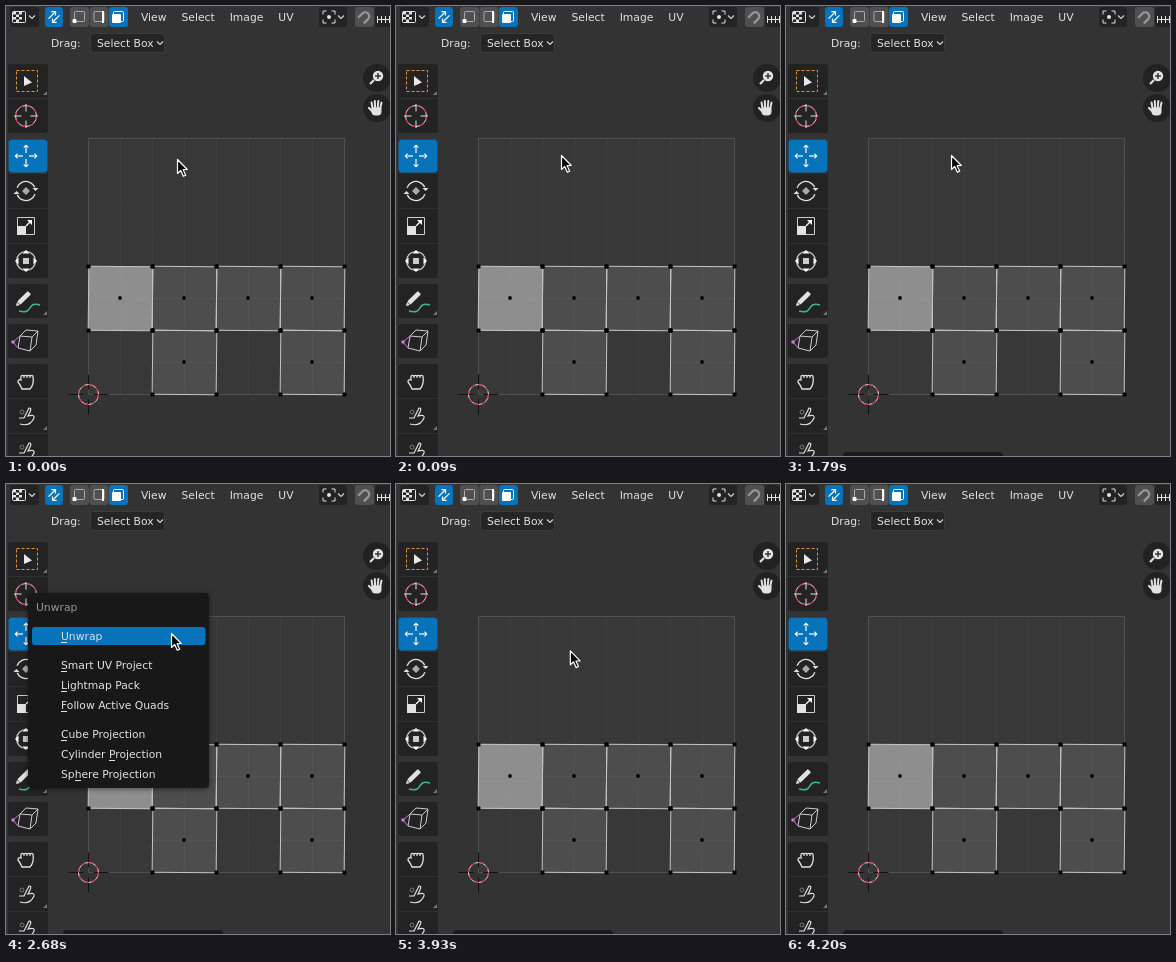
Write an HTML page with a canvas that moves like this. It is 384x450 px and loops after 4.46 s.

```html
<!DOCTYPE html>
<html lang="en">
<head>
<meta charset="utf-8">
<title>Unwrap menu</title>
<style>
html, body { margin: 0; width: 100%; height: 100%; overflow: hidden; background: #333; }
canvas { display: block; }
</style>
</head>
<body>
<canvas id="stage" width="384" height="450"></canvas>
<script>
const ctx = document.getElementById('stage').getContext('2d');
const LOOP = 4460;
const BLUE = '#0773bb', LIGHT = '#e2e2e2', DARK = '#232323', GREY = '#505050';
ctx.font = '10.75px "DejaVu Sans", sans-serif';

function paint(fill, edge, width = 1) {
  if (fill) { ctx.fillStyle = fill; ctx.fill(); }
  if (edge) { ctx.strokeStyle = edge; ctx.lineWidth = width; ctx.stroke(); }
}

function box(x, y, w, h, fill, radius = 3, edge) {
  ctx.beginPath();
  ctx.roundRect(x, y, w, h, radius);
  paint(fill, edge);
}

function circle(x, y, r, fill, edge, width) {
  ctx.beginPath();
  ctx.arc(x, y, r, 0, Math.PI * 2);
  paint(fill, edge, width);
}

function line(x1, y1, x2, y2, color = LIGHT, width = 1) {
  ctx.beginPath();
  ctx.moveTo(x1, y1);
  ctx.lineTo(x2, y2);
  paint(null, color, width);
}

function shape(points, fill, edge, width) {
  ctx.beginPath();
  points.forEach(([x, y]) => ctx.lineTo(x, y));
  ctx.closePath();
  paint(fill, edge, width);
}

function at(x, y, draw, angle = 0) {
  ctx.save();
  ctx.translate(x, y);
  ctx.rotate(angle);
  draw();
  ctx.restore();
}

function around(count, draw) {
  for (let i = 0; i < count; i++) at(0, 0, draw, i * Math.PI * 2 / count);
}

function label(text, x, y, color = LIGHT) {
  ctx.fillStyle = color;
  ctx.fillText(text, x, y);
}

// Triangle pointing up, with its tip at (x, y).
const head = (x, y, size, color = '#fff') =>
  shape([[x, y], [x + size, y + size], [x - size, y + size]], color);

function chevron(x, y) {
  line(x - 3, y - 1.5, x, y + 1.5, '#ccc', 1.2);
  line(x, y + 1.5, x + 3, y - 1.5, '#ccc', 1.2);
}

function redRing(r) {
  const dash = r * Math.PI / 8;
  circle(0, 0, r, null, '#ddd');
  ctx.setLineDash([dash, dash]);
  circle(0, 0, r, null, '#d22845', 1.2);
  ctx.setLineDash([]);
}

function arrowPair() {
  around(2, () => {
    line(-2.7, -4, -2.7, 5, '#fff', 1.2);
    line(-2.7, -5, -5.7, -2, '#fff', 1.2);
    line(-2.7, -5, 0, -2, '#fff', 1.2);
  });
}

function checkerIcon() {
  box(6.5, 5.5, 13, 11, null, 1, LIGHT);
  ctx.fillStyle = LIGHT;
  for (let i = 0; i < 12; i++) {
    const col = i % 3, row = Math.floor(i / 3);
    if ((col + row) % 2 === 0) ctx.fillRect(7 + col * 3, 6 + row * 2.5, 3, 2.5);
  }
}

function magnet() {
  ctx.beginPath();
  ctx.moveTo(-4, 5);
  ctx.arc(0, -1, 4, Math.PI, 0);
  ctx.lineTo(4, 5);
  paint(null, '#999', 2.2);
}

function selectModes() {
  for (let i = 0; i < 3; i++) {
    const x = 64 + i * 19.5, on = i === 2;
    box(x, 1, 19, 20, on ? BLUE : GREY, 3);
    box(x + 4.5, 5.5, 10, 10, null, 1, on ? '#fff' : '#aaa');
    if (i === 0) box(x + 2.5, 13, 4, 4, '#fff', 1);
    if (i === 1) line(x + 13.5, 5, x + 13.5, 17, '#fff', 2);
    if (on) box(x + 3, 8, 9, 9, '#fff', 1);
  }
}

function header() {
  box(4, 1, 29, 20, DARK);
  checkerIcon();
  chevron(26, 11);
  box(39, 1, 18, 20, BLUE);
  at(48, 11, arrowPair, Math.PI / 4);
  selectModes();

  let x = 135;
  for (const name of ['View', 'Select', 'Image', 'UV']) {
    label(name, x, 15);
    x += ctx.measureText(name).width + 15;
  }

  box(313, 1, 28, 20, DARK);
  at(323, 11, () => around(4, () => {
    line(-6, -6, -2.5, -6);
    line(-6, -6, -6, -2.5);
  }));
  circle(323, 11, 2, LIGHT);
  chevron(335, 11);

  box(349, 1, 19, 20, GREY);
  at(358.5, 11, magnet, Math.PI / 4);
  box(369, 1, 24, 20, DARK);
  line(371, 13.5, 384, 13.5);
  for (let tick = 371.5; tick < 384; tick += 4) line(tick, 10, tick, 17);

  label('Drag:', 45, 41);
  box(84.5, 27.5, 74, 19, '#252525', 3, '#3c3c3c');
  label('Select Box', 91, 41);
  chevron(154, 37);
}

// Tool icons, drawn around the centre of their button.
function selectIcon() {
  ctx.setLineDash([3, 2]);
  box(-9.5, -10.5, 21, 21, null, 0, '#dd9540');
  ctx.setLineDash([]);
  shape([[-2, -5], [-2, 5], [6, 1.5]], '#e8e8e8');
}

function cursorIcon() {
  redRing(10.5);
  around(4, () => line(0, -4.5, 0, -12));
}

function moveIcon() {
  around(4, () => {
    line(0, -3, 0, -8, '#fff', 1.2);
    head(0, -11.5, 3);
  });
}

function rotateIcon() {
  around(2, () => {
    ctx.beginPath();
    ctx.arc(0, 0, 9.5, -2.8, -0.4);
    paint(null, LIGHT, 1.3);
    at(9.5, 0, () => head(0, 0, 3, LIGHT), Math.PI);
  });
  at(0, 0, () => box(-2.8, -2.8, 5.6, 5.6, '#aaa', 0), Math.PI / 4);
}

function scaleIcon() {
  box(-8.5, -8.5, 17, 17, null, 0, '#ccc');
  box(-9, 0, 9, 9, LIGHT, 0);
  line(0, 0, 5, -5, '#fff', 1.2);
  shape([[6, -6], [1, -6], [6, -1]], '#fff');
}

function transformIcon() {
  circle(0, 0, 9.5, null, '#ccc', 1.2);
  box(-3, -3, 6, 6, '#ccc', 0);
  around(4, () => head(0, -11, 3.5));
}

function annotateIcon() {
  ctx.beginPath();
  ctx.moveTo(-7, 10);
  ctx.bezierCurveTo(8, 14, 0, 0, 14, 4);
  paint(null, '#3fb984', 1.6);
  at(-10, 5, () => {
    box(4, -2.3, 15, 4.6, LIGHT, 1);
    shape([[0, 0], [3.5, -2], [3.5, 2]], LIGHT);
  }, -Math.PI / 4);
}

function shearIcon() {
  const front = [[-6, -5], [6, -4], [4, 10], [-8, 7]];
  const back = front.map(([x, y]) => [x + 6, y - 6]);
  shape(front, null, '#ccc');
  for (let i = 0; i < 3; i++) line(...front[i], ...back[i], '#ccc');
  for (let i = 0; i < 2; i++) line(...back[i], ...back[i + 1], '#ccc');
  line(-13, 1, -6, -5, '#c77bd8');
  line(-13, 1, -8, 7, '#c77bd8');
  circle(-13, 1, 1.8, '#c77bd8');
}

function grabIcon() {
  ctx.beginPath();
  ctx.moveTo(-4, 8);
  ctx.quadraticCurveTo(-5, 5, -8, 1);
  ctx.quadraticCurveTo(-8, -2, -5, -1);
  for (let i = 0; i < 4; i++) ctx.arc(-3.5 + i * 3, -4, 1.6, Math.PI, 0);
  ctx.quadraticCurveTo(8, 4, 4, 8);
  ctx.closePath();
  paint(null, LIGHT, 1.3);
}

function fingerIcon() {
  ctx.beginPath();
  ctx.moveTo(-7, 2);
  ctx.lineTo(-2, 2);
  ctx.lineTo(3, -8);
  ctx.quadraticCurveTo(6, -8, 4, -4);
  ctx.lineTo(2, 0);
  ctx.quadraticCurveTo(9, -2, 8, 2);
  ctx.quadraticCurveTo(4, 11, -6, 8);
  paint(null, LIGHT, 1.2);
  circle(-4, -4, 2, null, '#777');
}

const TOOLS = [
  [selectIcon, cursorIcon],
  [moveIcon, rotateIcon, scaleIcon, transformIcon],
  [annotateIcon],
  [shearIcon],
  [grabIcon, fingerIcon, fingerIcon]
];
const HAS_MORE = [selectIcon, annotateIcon, fingerIcon];

function toolbar() {
  let y = 58;
  for (const group of TOOLS) {
    box(2, y, 40, group.length * 35 - 1, DARK);
    group.forEach((icon, i) => {
      if (i) line(2, y - 0.5, 42, y - 0.5, '#303030');
      if (icon === moveIcon) box(2.5, y + 0.5, 39, 33, BLUE, 3, '#1d4f70');
      at(20, y + 17, icon);
      if (HAS_MORE.includes(icon)) shape([[41, y + 27], [41, y + 31], [37, y + 31]], '#777');
      y += 35;
    });
    y += 5;
  }
}

function openHand() {
  ctx.lineCap = 'round';
  for (let i = 0; i < 4; i++) {
    at(-3.5 + i * 2.6, 0, () => line(0, 2, 0, i % 3 ? -7 : -5.5, LIGHT, 2), (i - 1.3) * 0.13);
  }
  line(-7, 0, -3, 4, LIGHT, 2.2);
  box(-4.5, -0.5, 10, 8, LIGHT, [1, 1, 4, 4]);
}

function viewButtons() {
  for (const y of [72, 102]) circle(371, y, 14, '#222');
  circle(372, 70, 5.2, LIGHT);
  line(368, 74, 364, 78, LIGHT, 2.2);
  line(369, 70, 375, 70, '#222', 1.3);
  line(372, 67, 372, 73, '#222', 1.3);
  at(370, 102, openHand);
}

const CELL = 64, HALF = CELL / 2, TILT = 0.011;
const FACE_ROWS = ['####', ' # #'];

function eachFace(draw) {
  FACE_ROWS.forEach((row, r) => [...row].forEach((mark, c) => {
    if (mark === '#') draw(82.5 + c * CELL, 260.5 + r * CELL, r + c === 0);
  }));
}

function layout() {
  box(82.5, 132.5, 256, 256, '#383838', 0);
  for (let p = HALF; p < 256; p += HALF) {
    line(82.5, 132.5 + p, 338, 132.5 + p, '#393939');
    line(82.5 + p, 132, 82.5 + p, 388, '#3f3f3f');
  }
  box(82.5, 132.5, 256, 256, null, 0, GREY);

  // Every face leans slightly clockwise about its own centre.
  eachFace((x, y, active) => at(x + HALF, y + HALF, () => {
    box(-HALF, -HALF, CELL, CELL, active ? '#8e8e8e' : '#4d4d4d', 0);
    const cross = active ? '#929292' : '#555';
    around(4, () => line(0, 0, 0, -HALF, cross));
  }, TILT));
  eachFace((x, y) => at(x + HALF, y + HALF, () =>
    box(-HALF, -HALF, CELL, CELL, null, 0, '#c4c4c4'), TILT));
  eachFace((x, y) => {
    for (const dx of [0, CELL]) for (const dy of [0, CELL]) box(x + dx - 2, y + dy - 2, 4, 4, '#000', 1);
    circle(x + HALF - 0.5, y + HALF - 0.5, 1.9, '#000');
  });

  at(82.5, 388.5, () => {
    around(4, () => line(0, -5, 0, -20, '#111'));
    redRing(10);
  });
}

// An underscore marks the shortcut letter that follows it.
const MENU = [
  ['_Unwrap'],
  ['_Smart UV Project', '_Lightmap Pack', '_Follow Active Quads'],
  ['_Cube Projection', 'Cylinder _Projection', 'Sp_here Projection']
];

function menu() {
  ctx.save();
  ctx.shadowColor = 'rgba(0,0,0,.5)';
  ctx.shadowBlur = 5;
  ctx.shadowOffsetY = 1;
  box(22, 109, 181, 195, '#181818', 4);
  ctx.restore();
  label('Unwrap', 30, 127, '#989898');
  box(26, 143, 173.5, 18, BLUE);
  let y = 156;
  for (const group of MENU) {
    for (const item of group) {
      const [before, after] = item.split('_');
      label(before + after, 55, y);
      ctx.fillRect(Math.round(55 + ctx.measureText(before).width), y + 2, 6, 1);
      y += 20;
    }
    y += 9;
  }
}

const LEAVE = 3850, GONE = 4200, STEPS = 4;

// The pointer leaves in a few accelerating jumps.
function pointerTip(t) {
  if (t < 90) return [172, 154];
  if (t < LEAVE) return [166, 150];
  const step = Math.floor((t - LEAVE) / (GONE - LEAVE) * STEPS) + 1;
  const p = (step / STEPS) ** 2;
  return [166 + 141 * p, 150 + 277 * p];
}

function pointer([x, y]) {
  at(x - 0.5, y - 0.5, () => {
    ctx.lineJoin = 'round';
    shape([[0, 0], [0, 14], [3.2, 11], [5.8, 16.8], [8.2, 15.7], [5.6, 10.2], [9.8, 10]],
      '#050505', '#fff', 1.2);
  });
}

function frame(t) {
  ctx.fillStyle = '#333';
  ctx.fillRect(0, 0, 384, 450);
  layout();
  header();
  toolbar();
  viewButtons();
  if (t >= 1790) box(57, 446, 160, 12, '#1a1a1a', 4);
  if ((t >= 800 && t < 1790) || (t >= 2680 && t < 3580)) menu();
  if (t < GONE) pointer(pointerTip(t));
}

const begin = performance.now();
function tick() {
  frame((performance.now() - begin) % LOOP);
  requestAnimationFrame(tick);
}
tick();
</script>
</body>
</html>
```
